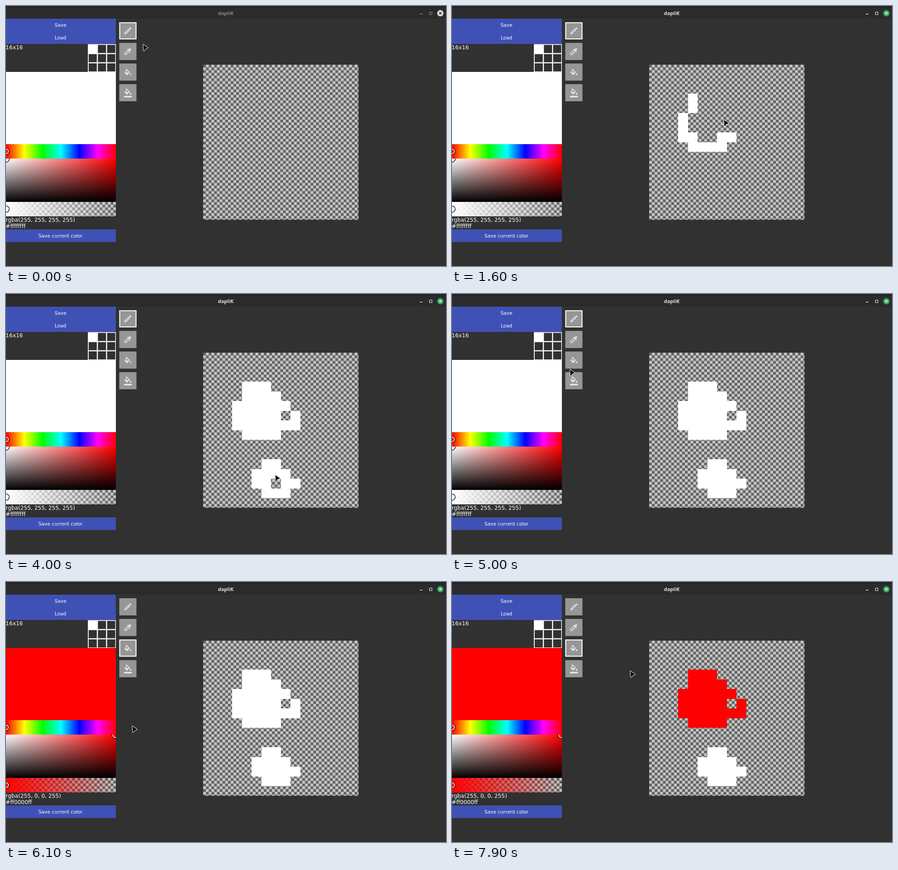
Animation, 973 px wide and 576 px high, one loop 8 s. Source, as an HTML page with a canvas:

```html
<!DOCTYPE html>
<html lang="en">
<head>
<meta charset="utf-8">
<title>Pixel editor</title>
<style>
  html, body { margin: 0; width: 100%; height: 100%; overflow: hidden; background: #313131; }
  canvas { display: block; width: 100%; height: 100%; }
</style>
</head>
<body>
<canvas id="stage" width="973" height="576"></canvas>
<script>
const ctx = document.getElementById('stage').getContext('2d');
const LOOP = 8000, TICK = 100;
const SIDE = 243, CHECK = 6.09;
const BOARD = { x: 436, y: 130, size: 343.5, cell: 21.5 };
const BG = '#313131', BLUE = '#3f51b5';
const AT = { focus: 5, bucket: 52, red: 60, fill: 71 };

// Pointer track, in ticks: rests on a spot, or strokes that paint one cell per step
const track = [];

function rest(x, y, from, to = from) {
  track.push({ t: from, x, y }, { t: to, x, y });
}

// Steps are compass directions: 's' is one cell down, 'nw' one up and left
function stroke(from, to, col, row, steps) {
  const moves = steps.split(' ');
  const cells = [{ t: from, col, row }];
  moves.forEach((m, i) => {
    col += m.includes('e') - m.includes('w');
    row += m.includes('s') - m.includes('n');
    cells.push({ t: from + (to - from) * (i + 1) / moves.length, col, row });
  });
  for (const c of cells) {
    track.push({
      t: c.t,
      x: BOARD.x + (c.col + 0.4) * BOARD.cell,
      y: BOARD.y + (c.row + 0.4) * BOARD.cell
    });
  }
  return cells;
}

rest(303, 85, 0);
rest(269, 49, 3, 6);
const outline = stroke(9, 15.6, 4, 3, 's sw s s e s e e e n e');
rest(601, 252, 16);
const inside = stroke(16.6, 23, 9, 7, 'n nw nw nw w s e se w w w s e e e sw w');
rest(470, 207, 24);
rest(323, 175, 25);
rest(244, 135, 26, 27);
rest(444, 341, 28, 29);
const lower = stroke(30, 40.5, 7, 11, 'w sw s e s e e n n w w e e se nw w s');
rest(238, 227, 47);
rest(268, 147, 51, 53);
rest(200, 347, 56);
rest(223, 366, 59);
rest(279, 319, 61);
rest(490, 494, 63);
rest(565, 279, 65);
rest(541, 264, 67, 73);
rest(394, 197, 79);
const upper = [...outline, ...inside];

const PENCIL = new Path2D('M3 17.2V21H6.8L17.8 9.9 14 6.2ZM14 9l1 1L5.9 19H5V18Z' +
  'M15.1 5.1l3.8 3.8L20.7 7a1 1 0 0 0 0-1.4L18.4 3.3a1 1 0 0 0-1.4 0Z');
const DROPPER = new Path2D('M3 16.2V21H7.8L16.7 12.1 18.1 13.5 19.5 12.1 17.6 10.2 20.7 7' +
  'L17.7 3 13.8 6.4 11.9 4.5 10.5 5.9 11.9 7.3ZM5 17.1L13 9 15 10.9 6.9 19H5Z');
const BUCKET = new Path2D('M16.6 8.9L7.6 0 6.2 1.4 8.6 3.8 2.9 10 10 17 17 10Z' +
  'M5.2 10L10 5.2 14.8 10ZM19 11.5s-2 2.2-2 3.5a2 2 0 0 0 4 0c0-1.3-2-3.5-2-3.5Z');
const BUCKET_BAR = new Path2D('M2 20H22V24H2Z');
BUCKET_BAR.addPath(BUCKET);
const TOOLS = [
  { icon: PENCIL, drop: 0 },
  { icon: DROPPER, drop: 0 },
  { icon: BUCKET, drop: 2.6 },
  { icon: BUCKET_BAR, drop: 0 }
];
const ARROW = new Path2D('M1 1L10.5 7.5Q11.2 8.5 10 8.8L6.3 9.8 3.4 13.8Q2 15 1.7 13.4Z');

function rect(x, y, w, h, fill) {
  ctx.fillStyle = fill;
  ctx.fillRect(x, y, w, h);
}

function text(str, x, y, size, align = 'left') {
  ctx.font = `${size}px "DejaVu Sans", sans-serif`;
  ctx.textAlign = align;
  ctx.fillStyle = '#fff';
  ctx.fillText(str, x, y);
}

function gradient(x0, y0, x1, y1, colors) {
  const g = ctx.createLinearGradient(x0, y0, x1, y1);
  colors.forEach((c, i) => g.addColorStop(i / (colors.length - 1), c));
  return g;
}

function clipped(x, y, w, h, draw) {
  ctx.save();
  ctx.beginPath();
  ctx.rect(x, y, w, h);
  ctx.clip();
  draw();
  ctx.restore();
}

function checker(x, y, w, h) {
  clipped(x, y, w, h, () => {
    rect(x, y, w, h, '#646464');
    for (let j = 0; j * CHECK < h; j++) {
      for (let i = (j + 1) % 2; i * CHECK < w; i += 2) {
        rect(x + i * CHECK, y + j * CHECK, CHECK, CHECK, '#c6c6c6');
      }
    }
  });
}

function circle(x, y, r) {
  ctx.beginPath();
  ctx.arc(x, y, r, 0, Math.PI * 2);
}

function ring(x, y, r, color) {
  circle(x, y, r);
  ctx.lineWidth = 1.6;
  ctx.strokeStyle = color;
  ctx.stroke();
}

function marker(x, y) {
  ring(x, y, 7, '#000');
  ring(x, y, 5.6, '#fff');
}

function button(label, y) {
  ctx.beginPath();
  ctx.roundRect(-4, y, SIDE + 4, 28, 3);
  ctx.fillStyle = BLUE;
  ctx.fill();
  text(label, 120.5, y + 18, 10.65, 'center');
}

function titleBar(focused) {
  rect(0, 0, 973, 28, '#2b2b2b');
  rect(0, 0, 973, 3, '#20212a');
  const ink = focused ? '#dedede' : '#858585';
  ctx.font = 'bold 11px "Noto Sans", sans-serif';
  ctx.textAlign = 'center';
  ctx.fillStyle = ink;
  ctx.fillText('dapliK', 486, 20);

  rect(915, 17, 6, 1.5, ink);
  ctx.strokeStyle = ink;
  ctx.lineWidth = 1.2;
  ctx.strokeRect(936.5, 13.5, 5.5, 5.5);

  circle(960.5, 16, 7);
  ctx.fillStyle = focused ? '#35a860' : '#dcdcdc';
  ctx.fill();
  ctx.beginPath();
  for (const s of [-1, 1]) {
    ctx.moveTo(958, 16 - 2.5 * s);
    ctx.lineTo(963, 16 + 2.5 * s);
  }
  ctx.lineWidth = 1.7;
  ctx.strokeStyle = focused ? '#fff' : '#2b2b2b';
  ctx.stroke();
}

function palette() {
  rect(181, 84.5, 62, 62, '#fff');
  for (let i = 1; i < 9; i++) {
    rect(182.8 + (i % 3) * 20.4, 86.2 + Math.floor(i / 3) * 20.4, 18, 18, BG);
  }
}

function picker(red) {
  rect(0, 146, SIDE, 160, red ? '#f00' : '#fff');

  rect(0, 306, SIDE, 32,
    gradient(0, 0, SIDE, 0, ['#f00', '#ff0', '#0f0', '#0ff', '#00f', '#f0f', '#f00']));
  clipped(0, 306, SIDE, 32, () => marker(0, 322));

  rect(0, 338, SIDE, 96, gradient(0, 0, SIDE, 0, ['#fff', '#f00']));
  rect(0, 338, SIDE, 96, gradient(0, 338, 0, 434, ['rgba(0,0,0,0)', '#000']));
  clipped(0, 338, SIDE, 96, () => marker(red ? 241.5 : 0, 339));

  const rgb = red ? '255, 0, 0' : '255, 255, 255';
  checker(0, 434, SIDE, 32);
  rect(0, 434, SIDE, 32, gradient(0, 0, SIDE, 0, [`rgba(${rgb}, 1)`, `rgba(${rgb}, 0)`]));
  clipped(0, 434, SIDE, 32, () => marker(0, 450));

  text(`rgba(${rgb}, 255)`, -0.7, 478, 12.18);
  text(red ? '#ff0000ff' : '#ffffffff', -0.7, 492, 12.18);
}

function toolbar(active) {
  TOOLS.forEach(({ icon, drop }, i) => {
    const y = 36 + i * 45.7;
    rect(250.5, y, 38, 38, '#969696');
    if (i === active) {
      ctx.lineWidth = 2;
      ctx.strokeStyle = '#fff';
      ctx.strokeRect(251.5, y + 1, 36, 36);
    }
    ctx.save();
    ctx.translate(259.2, y + 8.7 + drop);
    ctx.scale(0.86, 0.86);
    ctx.fillStyle = '#e6e6e6';
    ctx.fill(icon, 'evenodd');
    ctx.restore();
  });
}

function paint(cells, tick, color) {
  const edge = (origin, n) => Math.round(origin + n * BOARD.cell - 0.1);
  for (const { t, col, row } of cells) {
    if (t > tick) break;
    const x = edge(BOARD.x, col), y = edge(BOARD.y, row);
    rect(x, y, edge(BOARD.x, col + 1) - x, edge(BOARD.y, row + 1) - y, color);
  }
}

function pointer(tick) {
  const next = Math.max(1, track.findIndex(p => p.t >= tick));
  const a = track[next - 1], b = track[next];
  const k = b.t > a.t ? (tick - a.t) / (b.t - a.t) : 0;
  ctx.save();
  ctx.translate(a.x + (b.x - a.x) * k - 0.4, a.y + (b.y - a.y) * k - 0.4);
  ctx.lineJoin = 'round';
  ctx.lineWidth = 2;
  ctx.strokeStyle = '#fff';
  ctx.stroke(ARROW);
  ctx.fillStyle = '#000';
  ctx.fill(ARROW);
  ctx.restore();
}

function draw(tick) {
  rect(0, 0, 973, 576, BG);
  titleBar(tick >= AT.focus);
  button('Save', 28);
  button('Load', 56);
  text('16x16', -0.7, 96, 12.18);
  palette();
  picker(tick >= AT.red);
  button('Save current color', 495);
  toolbar(tick >= AT.bucket ? 2 : 0);
  checker(BOARD.x, BOARD.y, BOARD.size, BOARD.size);
  paint(upper, tick, tick >= AT.fill ? '#f00' : '#fff');
  paint(lower, tick, '#fff');
  pointer(tick);
}

const start = performance.now();
function frame() {
  // The picture advances in whole ticks
  draw(Math.floor(((performance.now() - start) % LOOP) / TICK));
  requestAnimationFrame(frame);
}
frame();
</script>
</body>
</html>
```
